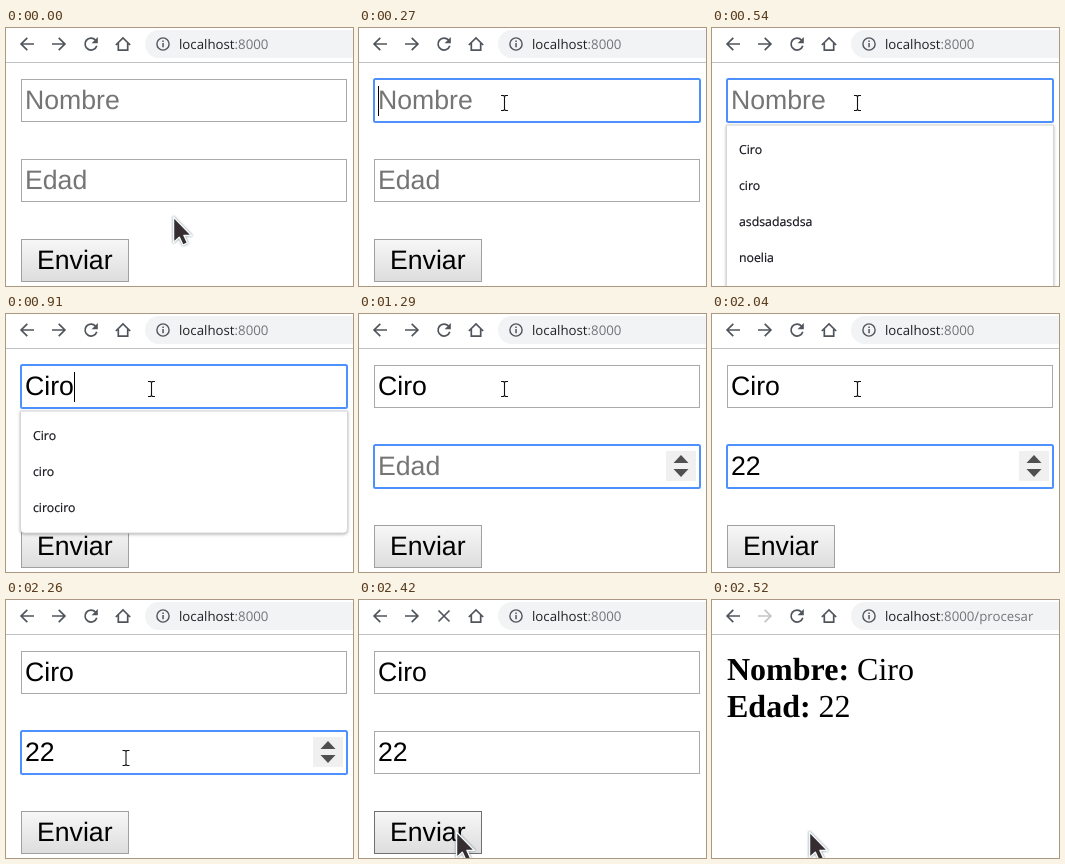
Animation, 347 px wide and 258 px high, one loop 2.89 s. Source, as an HTML page:

```html
<!DOCTYPE html>
<html lang="es">
<head>
<meta charset="utf-8">
<style>
  html, body { margin: 0; width: 100%; height: 100%; overflow: hidden; background: #fff; }
  svg { display: block; width: 347px; height: 258px; text-rendering: geometricPrecision; }
  .ui { font-family: "Open Sans", "Noto Sans", sans-serif; }
  .url { font-size: 13.25px; fill: #202124; }
  .dim { fill: #737679; }
  .item { font-size: 12.3px; font-weight: 500; fill: #14141c; stroke: #14141c; stroke-width: 0.2; }
  .form { font: 26.67px "Liberation Sans", Arial, sans-serif; }
  .page { font: 32px "Liberation Serif", "Times New Roman", serif; }
  .page .label { font-weight: bold; }
  .icon { fill: none; stroke: #50555c; stroke-width: 1.7; }
  .menu { fill: #fff; stroke: #d6d6d6; filter: drop-shadow(0 1px 1.5px rgba(0,0,0,.3)); }
  #arrow { filter: drop-shadow(0 0 0.8px rgba(40,60,70,.6)); }
</style>
</head>
<body>
<svg viewBox="0 0 347 258">
  <defs>
    <linearGradient id="face" x2="0" y2="1">
      <stop stop-color="#f7f7f7"/><stop offset="1" stop-color="#dddddd"/>
    </linearGradient>
    <linearGradient id="pressed" x2="0" y2="1">
      <stop stop-color="#dddddd"/><stop offset="1" stop-color="#f7f7f7"/>
    </linearGradient>
  </defs>
  <rect width="347" height="258" fill="#fff"/>

  <g id="toolbar">
    <rect y="34" width="347" height="1" fill="#bfc1c3"/>
    <rect x="139" y="2" width="240" height="28" rx="14" fill="#f1f3f4"/>
    <path class="icon" d="M28 16H15.5M21.3 9.8L15.1 16l6.2 6.2"/>
    <path id="forward" class="icon" d="M46 16h12.5M52.7 9.8L58.9 16l-6.2 6.2"/>
    <g id="reload">
      <path class="icon" d="M89.5 12A6 6 0 1 0 90.8 17.8"/>
      <path d="M91.8 9v6.2h-6.2z" fill="#50555c"/>
    </g>
    <path id="stop" class="icon" d="M79.5 10.5l11 11M90.5 10.5l-11 11"/>
    <path class="icon" d="M109.8 17L117 10l7.2 7M112.3 15v7.2h9.4V15"/>
    <circle class="icon" cx="157" cy="16" r="6.1" style="stroke-width:1.4"/>
    <path d="M156.3 15h1.5v4.3h-1.5zM156.3 12.4h1.5v1.5h-1.5z" fill="#50555c"/>
    <text class="ui url" x="173" y="21">localhost<tspan id="path" class="dim">:8000</tspan></text>
  </g>

  <g id="form">
    <g id="name"></g>
    <g id="age"></g>
    <rect id="button" x="15.5" y="211.5" width="107" height="42"/>
    <text class="form" x="31" y="240.5">Enviar</text>
    <g id="list"></g>
  </g>

  <g id="result" class="page">
    <text x="15" y="80"><tspan class="label">Nombre:</tspan> Ciro</text>
    <text x="15" y="117"><tspan class="label">Edad:</tspan> 22</text>
  </g>

  <g id="arrow">
    <path d="M0.5 0V25.5L6.3 20.3 10 28.2 14.5 26 11 18.4H18.5Z" fill="#352d30"
      stroke="#f4f9fb" stroke-width="1.5" stroke-linejoin="round"/>
  </g>
  <path id="beam" d="M-3.5 -7.5H-1L0 -6.5 1 -7.5H3.5M0 -6.5V6.5M-3.5 7.5H-1L0 6.5 1 7.5H3.5"
    fill="none" stroke="#111" stroke-width="1.1"/>
</svg>

<script>
const LOOP = 2890;
const CHAR_WIDTH = { C: 0.722, i: 0.222, r: 0.333, o: 0.556, 2: 0.556 };
const saved = ["Ciro", "ciro", "asdsadasdsa", "noelia", "ciro22"];
const matches = ["Ciro", "ciro", "cirociro"];
const $ = id => document.getElementById(id);

// Each step changes only the listed properties.
const start = {
  name: "", age: "", focus: "", caret: false, list: [], spin: false,
  button: "idle", pointer: "arrow", x: 167, y: 189, loading: false, done: false
};
const changes = [
  [0, {}],
  [50, { x: 164, y: 176 }],
  [110, { pointer: "beam", x: 156, y: 144, spin: true }],
  [160, { pointer: "arrow", x: 149, y: 107, spin: false }],
  [210, { pointer: "beam", x: 145.5, y: 75 }],
  [270, { focus: "name", caret: true }],
  [320, { list: saved }],
  [540, { caret: false }],
  [700, { name: "C", caret: true, list: matches }],
  [770, { name: "Ci" }],
  [840, { name: "Cir" }],
  [910, { name: "Ciro" }],
  [1020, { focus: "age", list: [], spin: true }],
  [1290, { caret: false }],
  [1500, { age: "2", caret: true, list: ["22"] }],
  [1610, { age: "22" }],
  [1770, { list: [] }],
  [2040, { caret: false }],
  [2100, { x: 142, y: 86 }],
  [2160, { pointer: "arrow", x: 133, y: 116 }],
  [2220, { pointer: "beam", x: 120, y: 158 }],
  [2290, { pointer: "arrow", x: 104, y: 206 }],
  [2360, { x: 97, y: 232, button: "pressed", focus: "", spin: false }],
  [2420, { button: "hover", loading: true }],
  [2520, { done: true, loading: false }]
];
let last = start;
const steps = changes.map(([at, change]) => ({ at, state: last = { ...last, ...change } }));

const show = (id, on) => $(id).setAttribute("display", on ? "inline" : "none");
const textWidth = s => [...s].reduce((w, c) => w + CHAR_WIDTH[c], 0) * 26.67;

function field(value, hint, top, focused, caret, spin) {
  const frame = focused
    ? `<rect x="15" y="${top}" width="326" height="43" rx="1.5" fill="#fff" stroke="#4d90fe" stroke-width="2"/>`
    : `<rect x="15.5" y="${top + 0.5}" width="325" height="42" fill="#fff" stroke="#a9a9a9"/>`;
  const text = `<text class="form" x="19" y="${top + 29.5}" fill="${value ? "#000" : "#757575"}">${value || hint}</text>`;
  const bar = focused && caret
    ? `<rect x="${Math.round(19 + textWidth(value))}" y="${top + 7}" width="1" height="30"/>` : "";
  const spinner = spin
    ? `<rect x="307" y="${top + 6}" width="30" height="30" fill="#f0f0f0"/>
       <path transform="translate(322 ${top + 21})" d="M0 -11l7.5 8h-15zM0 11l7.5 -8h-15z" fill="#505050"/>` : "";
  return frame + text + bar + spinner;
}

function menu(items, top) {
  if (!items.length) return "";
  const rows = items.map((s, i) =>
    `<text class="ui item" x="27" y="${top + 29 + 36 * i}">${s}</text>`).join("");
  const height = items.length * 36 + 14;
  return `<path class="menu" d="M14.5 ${top}h327v${height - 4}q0 4 -4 4h-319q-4 0 -4 -4z"/>${rows}`;
}

function render(s) {
  show("form", !s.done);
  show("result", s.done);
  show("reload", !s.loading);
  show("stop", s.loading);
  $("forward").style.opacity = s.done ? 0.35 : 1;
  $("path").textContent = s.done ? ":8000/procesar" : ":8000";
  $("name").innerHTML = field(s.name, "Nombre", 51, s.focus === "name", s.caret, false);
  $("age").innerHTML = field(s.age, "Edad", 131, s.focus === "age", s.caret, s.spin);
  $("list").innerHTML = menu(s.list, s.focus === "age" ? 177 : 97);
  $("button").setAttribute("fill", s.button === "pressed" ? "url(#pressed)" : "url(#face)");
  $("button").setAttribute("stroke", s.button === "idle" ? "#a0a0a0" : "#707070");
  for (const id of ["arrow", "beam"]) {
    show(id, s.pointer === id);
    $(id).setAttribute("transform", `translate(${s.x} ${s.y})`);
  }
}

let shown;
function tick() {
  const t = performance.now() % LOOP;
  const step = steps.findLast(s => s.at <= t);
  if (step !== shown) render((shown = step).state);
  requestAnimationFrame(tick);
}
tick();
</script>
</body>
</html>
```
